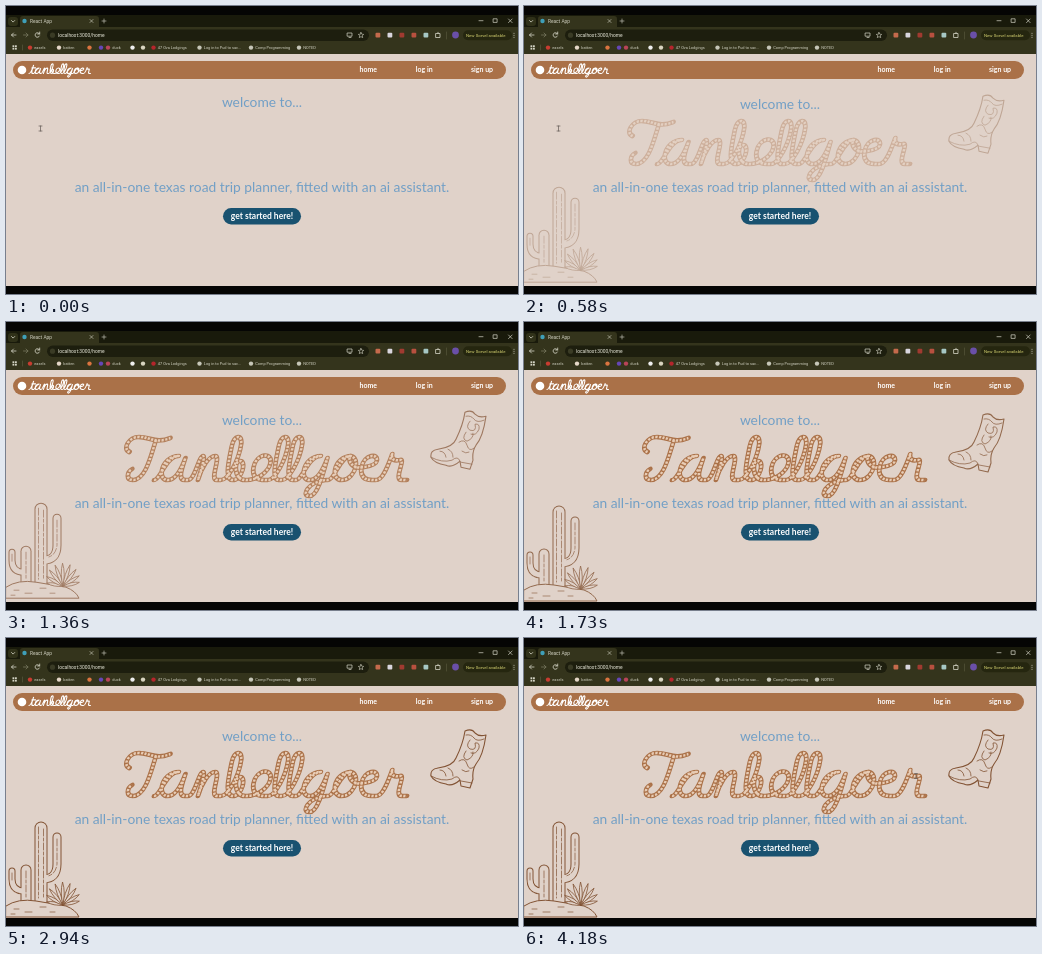
Recreate the animation shown at these times as an HTML page. Size 512 px wide and 288 px high, loop 4.21 s.

```html
<!DOCTYPE html>
<html lang="en">
<head>
<meta charset="utf-8">
<title>Road trip planner</title>
<style>
  html, body { margin: 0; width: 100%; height: 100%; overflow: hidden; background: #050504; }
  svg { display: block; }
  path { fill: none; stroke-linecap: round; stroke-linejoin: round; }
</style>
</head>
<body>
<svg id="stage" width="512" height="288"></svg>
<script>
const stage = document.getElementById('stage');
const LOOP = 4210;
const PAGE = [224, 210, 201];
const ROPE = [171, 114, 73];
const STRAND = [232, 204, 181];
const INK = [130, 83, 52];
const UI = 'Roboto, sans-serif';
const BODY = 'Lato, sans-serif';
const PALE = '#d5d5c6';
const PAPER = `rgb(${PAGE})`;

// Script letters as relative strokes; each ends where the next begins.
const GLYPHS = {
  T: 'm2,-28c-8,-3 -4,-15 6,-15c12,0 18,7 32,1m-14,2c-2,14 -2,40 -15,40c-7,0 -8,-8 -3,-11m24,11',
  t: 'c7,0 11,-20 13,-36c-2,12 -6,36 4,36h3m-12,-25h16m-4,25',
  a: 'c6,0 8,-24 20,-24c-9,0 -14,6 -14,14c0,6 3,10 8,10c7,0 11,-10 13,-22c-1,9 -4,22 4,22h3',
  n: 'c7,0 6,-24 10,-24c3,0 1,14 0,24c1,-12 6,-24 12,-24c7,0 -1,24 7,24h4',
  b: 'c7,0 14,-20 13,-36c-1,-10 -9,-9 -9,2c0,14 -1,34 8,34c9,0 10,-19 3,-19c-6,0 -2,19 9,19h2',
  e: 'c10,0 20,-8 20,-17c0,-11 -16,-10 -16,4c0,9 5,13 13,13h4',
  l: 'c7,0 14,-20 13,-36c-1,-10 -9,-9 -9,2c0,14 -1,34 7,34h3',
  g: 'c6,0 8,-24 20,-24c-9,0 -14,6 -14,14c0,6 3,10 8,10c7,0 11,-10 13,-22c-1,14 -2,38 -10,38c-9,0 -5,-14 13,-16h2',
  o: 'c6,0 8,-24 18,-24c-8,0 -13,6 -13,13c0,7 4,11 9,11c7,0 11,-7 11,-13c0,-8 -5,-11 -8,-11c0,9 9,13 17,11',
  E: 'c6,-1 11,-3 11,-6c0,-8 -14,-7 -14,6c0,9 5,13 13,13h4', // "e" joined from a high stroke
  r: 'c7,0 9,-14 11,-26c0,6 4,7 9,6c6,-1 -3,20 6,20h5'
};
const script = word => 'M0,0' + [...word].map(c => GLYPHS[c]).join('');

const clamp = v => Math.max(0, Math.min(1, v));
const smooth = v => { v = clamp(v); return v * v * (3 - 2 * v); };
const blend = (color, k) =>
  `rgb(${color.map((c, i) => Math.round(PAGE[i] + (c - PAGE[i]) * k)).join()})`;

let layer = stage;
function add(tag, attrs, text) {
  const el = document.createElementNS('http://www.w3.org/2000/svg', tag);
  for (const key in attrs) el.setAttribute(key, attrs[key]);
  if (text) el.textContent = text;
  return layer.appendChild(el);
}
function group(build, attrs) {
  const outer = layer;
  const g = layer = add('g', attrs);
  build();
  layer = outer;
  return g;
}
const rect = (x, y, width, height, fill, rx = 0) => add('rect', { x, y, width, height, fill, rx });
const dot = (cx, cy, r, fill) => add('circle', { cx, cy, r, fill });
const line = (d, color, width = 0.8, extra = '') =>
  add('path', { d, style: `stroke:${color};stroke-width:${width};${extra}` });
const label = (text, x, y, size, fill, family = UI, anchor = 'start', weight = 400) =>
  add('text', { x, y, fill, 'font-size': size, 'font-family': family,
    'text-anchor': anchor, 'font-weight': weight }, text);
const centered = (text, x, y, size, fill, weight) =>
  label(text, x, y, size, fill, BODY, 'middle', weight);

function buildBrowser() {
  rect(0, 0, 512, 288, '#050504');
  rect(0, 9, 512, 13, '#191a0b');
  rect(0, 21, 512, 27, '#34341c');
  rect(2, 11, 10, 9, '#303119', 3);
  line('M5.5 14.5l1.6 1.6 1.6-1.6', PALE);
  rect(14, 10, 79, 14, '#34341c', 3);
  dot(18.5, 15, 2.2, '#3f9fb8');
  label('React App', 24, 17, 4.8, PALE);
  line('M84 13.5l3 3m0-3l-3 3M96 15h4m-2-2v4', PALE, 0.6);
  line('M473 14.7h4M487.5 12.8h3.6v3.6h-3.6zM502.5 13l3.6 3.6m0-3.6l-3.6 3.6', PALE, 0.7);

  // Address row
  line('M10 29H5.5m2-2l-2 2 2 2', PALE);
  line('M17.5 29h4.5m-2-2l2 2-2 2', '#78785f');
  line('M33.5 28a2.3 2.3 0 1 0 0 2M33.7 26v2h-2', PALE);
  rect(41, 23.5, 322, 11.5, '#1d1e0e', 5.7);
  dot(46.5, 29.2, 2.6, '#3a3b25');
  label('localhost:3000/home', 52, 31, 4.9, '#ededdf');
  line('M341.5 27h4.5v3.2h-4.5zM343 31.5h2', PALE, 0.7);
  line('M355 26.5l.8 1.7 1.9.2-1.4 1.3.4 1.9-1.7-1-1.7 1 .4-1.9-1.4-1.3 1.9-.2z', PALE, 0.6);
  ['#c56a4c', '#d9d6de', '#a03a30', '#b8503f', '#a6c7c4'].forEach((c, i) =>
    rect(369.5 + i * 12, 26.7, 4.8, 4.8, c, 1));
  line('M430 27.5h4v4h-4zM432 26.3v1', PALE);
  line('M440.5 26v7', '#5b5b40', 0.6);
  dot(449.5, 29, 3.4, '#6a4fa8');
  rect(457, 24.2, 49, 10, '#25260f', 5);
  label('New Sorvel available', 460, 30.8, 4.3, '#d8d573');
  [27.2, 29.2, 31.2].forEach(y => dot(508, y, 0.5, PALE));

  // Bookmarks
  for (let i = 0; i < 4; i++) rect(6.5 + i % 2 * 2.5, 39.3 + (i >> 1) * 2.5, 1.8, 1.8, PALE);
  line('M16.5 39v5', '#67674b', 0.5);
  const marks = [
    [24, '#c83c30', 'easels'], [53, '#e5d7c8', 'batten'], [83.5, '#db7440'],
    [95, '#6546b8'], [102, '#b84458', 'duck'], [126.5, '#eeeeee'],
    [137, '#d8d4c0'], [147.5, '#b5252c', '47 Ova Lodgings'],
    [193.5, '#c6c6b8', 'Log in to Pud to sac...'],
    [245, '#c6c6b8', 'Comp Programming'], [293, '#c6c6b8', 'NOTED']
  ];
  for (const [x, color, text] of marks) {
    dot(x, 41.6, 2.2, color);
    if (text) label(text, x + 4.3, 43.1, 3.9, PALE);
  }
}

function buildPage() {
  const blue = '#719fc6';
  rect(0, 48, 512, 232, PAPER);
  rect(7, 55, 493, 18, '#aa7148', 9);
  dot(16, 64, 4.3, '#fff');
  group(() => line(script('tanbellgoEr'), '#fff', 5),
    { transform: 'matrix(.225 0 -.045 .225 23 67.5)' });
  centered('home', 362.3, 66.2, 7, '#fff', 700);
  centered('log in', 418.3, 66.2, 7, '#fff', 700);
  centered('sign up', 476, 66.2, 7, '#fff', 700);
  centered('an all-in-one texas road trip planner, fitted with an ai assistant.', 256, 186, 13.8, blue);
  rect(217, 202, 78, 16.5, '#195270', 8.2);
  centered('get started here!', 256, 213, 8.5, '#fff', 700);
  return centered('welcome to...', 256, 101, 13.8, blue);
}

function buildTitle() {
  const d = script('TanbellgoEr');
  line(d, 'var(--rope)', 4.7);
  line(d, 'var(--strand)', 2.5, 'stroke-dasharray:2.2 1.4;stroke-linecap:butt');
}

function buildCactus(ink) {
  const tubes = [
    ['M35 264V190', 13], ['M37 241Q51 241 51 226V199', 9],
    ['M20 266V232', 11], ['M18 253Q6 253 6 241V233', 7]
  ];
  tubes.forEach(([d, w]) => line(d, ink, w));
  tubes.forEach(([d, w]) => line(d, PAPER, w - 2));
  line('M32.5 189V260M37.5 191V259M20 233V260M51 201V226Q50 236 42 238M6 235V243',
    ink, 0.7, 'stroke-dasharray:7 2 3 2');
  const solid = `fill:${PAPER}`;
  line('M0 268Q12 260 30 263T60 268Q70 272 73 279H0z', ink, 1, solid);
  line('M8 271h5m6 3h7m8-5h6m4 5h5m-44 2h4', ink, 0.7);
  for (let i = 0; i < 9; i++) {
    const a = -2.95 + i * 0.34;
    const c = Math.cos(a), s = Math.sin(a);
    const len = 15 + 8 * Math.abs(s);
    const point = (r, side) => `${57 + c * r - s * side} ${267 + s * r + c * side}`;
    line(`M57 267Q${point(len * 0.55, 3)} ${point(len, 0)}Q${point(len * 0.55, -3)} 57 267`,
      ink, 0.8, solid);
  }
}

function buildBoot(ink) {
  line('M459 93Q466 90 469 95Q473 99 480 97Q477 118 470 126Q466 132 467 141L464 150L455 148L454 142Q446 149 440 146Q428 144 425 138Q424 131 432 130Q447 128 450 120Q457 106 459 93Z', ink, 1.1);
  line('M425 138Q436 144 446 141Q452 136 454 142M455 143l11 2M460 97q5-1 8 3t10 1', ink);
  line('M464 102q-5 6 0 9q7 2 5-6q5-1 4 5q-3 7-8 5M460 113q-5 7 1 9q7-3 6-8M453 123q6-4 8 3t7 3M434 132q5 0 6 6m2-8q5 2 5 8M456 132q4 3 7 1', ink);
}

buildBrowser();
const welcome = buildPage();
const art = group(() => { buildCactus('var(--ink)'); buildBoot('var(--ink)'); });
const title = group(buildTitle);
const pointer = line('M-1.5-2.5h3m-1.5 0v5m-1.5 0h3', '#625a55', 0.7);

const place = (el, x, y) => el.setAttribute('transform', `translate(${x} ${y})`);
const show = (el, on) => el.setAttribute('visibility', on ? 'visible' : 'hidden');

function render(t) {
  place(welcome, 0, 2 * smooth(t / 790));

  const artShow = 1 - Math.pow(1 - clamp(t / 2760), 1.8);
  art.style.setProperty('--ink', blend(INK, artShow));
  place(art, 0, -2.8 * (1 - smooth((t - 1360) / 340)));
  show(art, artShow > 0.01);

  const titleShow = clamp(t / 1600);
  const slide = -90 * Math.pow(1 - clamp(t / 790), 1.35);
  title.style.setProperty('--rope', blend(ROPE, titleShow));
  title.style.setProperty('--strand', blend(STRAND, titleShow));
  title.setAttribute('transform', `matrix(1 0 -.2 1 ${116 + slide} 158)`);
  show(title, titleShow > 0.01);

  const move = smooth((t - 3990) / 190);
  const moving = t >= 3990;
  place(pointer, moving ? 229 + 163 * move : 34.5, moving ? 211 - 73 * move : 122.5);
  show(pointer, moving || t < 1100);
}

const start = performance.now();
function tick() {
  render((performance.now() - start) % LOOP);
  requestAnimationFrame(tick);
}
tick();
</script>
</body>
</html>
```
